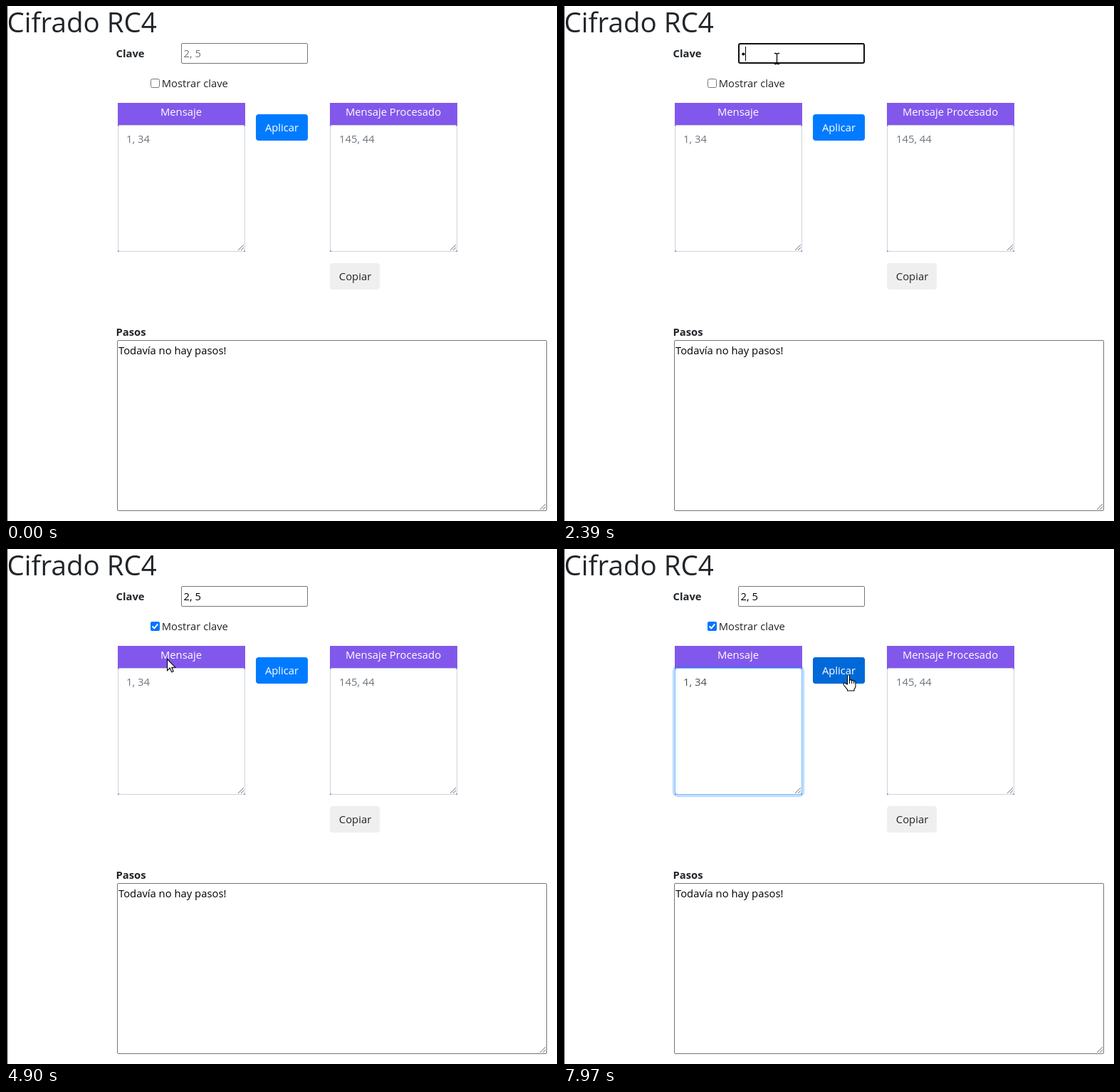
Recreate the animation shown at these times as an HTML page with a canvas. Size 774 by 723 pixels, loop 8 s.

```html
<!DOCTYPE html>
<html lang="es">
<head>
<meta charset="utf-8">
<title>Cifrado RC4</title>
<style>
  html, body { margin: 0; width: 100%; height: 100%; overflow: hidden; background: #fff; }
  canvas { display: block; }
</style>
</head>
<body>
<canvas id="stage" width="774" height="723"></canvas>
<script>
const ctx = document.getElementById('stage').getContext('2d');
const LOOP = 8000, BLINK = 550;
const FAMILY = '"Open Sans", "Noto Sans", sans-serif';
const BODY = '14.8px ' + FAMILY;
const BOLD = 'bold 14.8px ' + FAMILY;
const INK = '#212529', GRAY = '#767676', PURPLE = '#8258ec', HOLDER = '#6c757d';

// x, y, width, height
const key = [246, 52, 178, 29];
const message = [157, 167, 179, 178];
const result = [455, 167, 179, 178];
const steps = [156, 469, 604, 240];
const apply = [351, 152, 73, 37];
const copy = [455, 361, 70, 37];
const label = [219, 100, 94, 20];

// Pointer moves: start, end, number of positions, path
const moves = [
  [70, 820, 11, [[640, 600], [475, 500], [385, 330], [310, 160], [285, 110]]],
  [900, 1140, 4, [[282, 84], [276, 67]]],
  [1690, 1760, 2, [[290, 73], [300, 74]]],
  [3630, 4420, 11, [[279, 63], [255, 34], [235, 60], [215, 95], [203, 112]]],
  [4500, 4580, 2, [[199, 111], [197, 111]]],
  [4740, 5220, 7, [[203, 114], [226, 154], [243, 182], [249, 190]]],
  [5690, 5770, 2, [[246, 185], [238, 190]]],
  [7490, 7970, 7, [[220, 124], [275, 178], [372, 190], [402, 177]]]
];
const keyTimes = [2390, 2780, 3000, 3160];
const typed = [[6170, '1'], [6720, '1, '], [6940, '1, 3'], [7100, '1, 34']];

const inside = (p, [x, y, w, h]) =>
  p && p[0] >= x && p[0] < x + w && p[1] >= y && p[1] < y + h;

function pointerAt(t) {
  const move = moves.filter(m => m[0] <= t).pop();
  if (!move) return null;
  const [a, b, n, path] = move;
  const k = Math.min(n - 1, Math.floor((t - a) / (b - a) * (n - 1) + 0.02));
  const u = k / (n - 1) * (path.length - 1);
  const i = Math.min(path.length - 2, Math.floor(u + 1e-6));
  const f = u - i, p = path[i], q = path[i + 1];
  return [0, 1].map(c => Math.round(p[c] + (q[c] - p[c]) * f));
}

function text(s, x, y, color = INK, font = BODY, align = 'left') {
  ctx.font = font;
  ctx.fillStyle = color;
  ctx.textAlign = align;
  ctx.fillText(s, x, y);
}

function fillBox([x, y, w, h], color, r = 0) {
  ctx.beginPath();
  ctx.roundRect(x, y, w, h, r);
  ctx.fillStyle = color;
  ctx.fill();
}

function frame([x, y, w, h], color, r, line = 1) {
  ctx.beginPath();
  ctx.roundRect(x + line / 2, y + line / 2, w - line, h - line, r);
  ctx.strokeStyle = color;
  ctx.lineWidth = line;
  ctx.stroke();
}

function polyline(points, color, width, close) {
  ctx.beginPath();
  points.forEach(p => ctx.lineTo(p[0], p[1]));
  if (close) ctx.closePath();
  ctx.strokeStyle = color;
  ctx.lineWidth = width;
  ctx.stroke();
}

function grip([x, y, w, h]) {
  const r = x + w - 2, b = y + h - 2;
  for (const d of [8, 4]) polyline([[r - d, b], [r, b - d]], '#777', 1);
}

function caret(x, y, color, age) {
  if (age % (2 * BLINK) < BLINK) fillBox([Math.round(x), y, 1, 20], color);
}

function panel(box, title) {
  const [x, y, w, h] = box;
  fillBox([x, 136, w, y + h - 136], PURPLE);
  text(title, x + w / 2 - 0.5, 154, '#fff', BODY, 'center');
}

function area(box, focus) {
  const [x, y, w, h] = box;
  if (focus) {
    const s = 3.2 * focus;
    ctx.beginPath();
    ctx.roundRect(x - s, y - s, w + 2 * s, h + 2 * s, 4 + s);
    ctx.roundRect(x, y, w, h, 4);
    ctx.fillStyle = `rgba(0,123,255,${0.25 * focus})`;
    ctx.fill('evenodd');
  }
  fillBox(box, '#fff', 4);
  frame(box, '#ced4da', 3.5);
  if (focus) {
    ctx.globalAlpha = focus;
    frame(box, '#80bdff', 3.5);
    ctx.globalAlpha = 1;
  }
  grip(box);
}

function drawKey(t, pointer) {
  const focused = t >= 1380 && t < 4500;
  if (focused) frame(key, '#101010', 2, 2);
  else frame(key, inside(pointer, key) ? '#222' : GRAY, 1.5);

  const count = keyTimes.filter(k => k <= t).length;
  if (t >= 4740) text('2, 5', 249.5, 72, '#000');
  else if (!count) text('2, 5', 249.5, 72, '#757575');
  else {
    ctx.fillStyle = '#000';
    for (let i = 0; i < count; i++) {
      ctx.beginPath();
      ctx.arc(253.4 + 6.4 * i, 67.5, 2.1, 0, 7);
      ctx.fill();
    }
  }
  if (focused) caret(250 + 6.4 * count, 57, '#000', t - (count ? keyTimes[count - 1] : 1380));
}

function drawCheck(t) {
  const box = [203, 102, 13, 13];
  if (t >= 4740) {
    fillBox(box, '#0075ff', 2);
    polyline([[205.5, 108.5], [208.3, 111.3], [213.3, 105.3]], '#fff', 2);
  } else frame(box, GRAY, 2);
  text('Mostrar clave', 218.7, 114);
}

function drawMessage(t) {
  panel(message, 'Mensaje');
  const fade = Math.floor((t - 5380) / 75 + 1) / 3;
  area(message, Math.max(0, Math.min(1, fade)));
  const last = typed.filter(k => k[0] <= t).pop();
  const value = last ? last[1] : '';
  text(value || '1, 34', 169, 192, value ? '#495057' : HOLDER);
  if (t >= 5380) {
    caret(169.5 + ctx.measureText(value).width, 176, '#495057', t - (last ? last[0] : 5380));
  }
}

function drawBeam(ghost) {
  const bars = () => {
    ctx.beginPath();
    ctx.moveTo(-3, -7.5); ctx.lineTo(-1, -7.5); ctx.lineTo(0.5, -6.5);
    ctx.lineTo(2, -7.5); ctx.lineTo(4, -7.5);
    ctx.moveTo(0.5, -6.5); ctx.lineTo(0.5, 6.5);
    ctx.moveTo(-3, 7.5); ctx.lineTo(-1, 7.5); ctx.lineTo(0.5, 6.5);
    ctx.lineTo(2, 7.5); ctx.lineTo(4, 7.5);
    ctx.stroke();
  };
  ctx.strokeStyle = ghost ? '#555' : '#000';
  ctx.lineWidth = ghost ? 2.8 : 1.3;
  bars();
  if (ghost) {
    ctx.strokeStyle = '#fff';
    ctx.lineWidth = 1;
    bars();
  }
}

function drawShape(d) {
  const path = new Path2D(d);
  ctx.fillStyle = '#fff';
  ctx.fill(path);
  ctx.strokeStyle = '#000';
  ctx.lineWidth = 1.1;
  ctx.stroke(path);
}

function drawPointer(p, t) {
  if (!p) return;
  ctx.save();
  ctx.translate(p[0], p[1]);
  if ([key, message, result, steps, label].some(b => inside(p, b))) {
    drawBeam(t >= 3630 && t < 4500);
  } else if ([apply, copy].some(b => inside(p, b))) {
    drawShape('M-2.5 13V1.5Q-2.5-.5-1-.5T.5 1.5V8Q.8 6.4 2.2 6.6T3.7 8.3Q4 7 5.3 7.3T6.7 9Q7.2 8 8.2 8.6' +
      'T9 10.5V15Q9 18 7 20V22H-2.5V20.5L-7.5 14Q-8.8 12-7.2 11.2T-4.5 12.2Z');
    polyline([[0.5, 8], [0.5, 12]], '#000', 1);
    polyline([[3.7, 8.5], [3.7, 12]], '#000', 1);
    polyline([[6.7, 9], [6.7, 12]], '#000', 1);
  } else {
    drawShape('M.5 .5V16.6L4.2 13L6.7 18.8L9.2 17.7L6.8 12.2H11.8Z');
  }
  ctx.restore();
}

function draw(t) {
  const pointer = pointerAt(t);
  fillBox([0, 0, 774, 723], '#fff');
  fillBox([0, 0, 2, 723], '#000');
  text('Cifrado RC4', 1.5, 37, INK, '500 38.5px ' + FAMILY);

  text('Clave', 154.5, 72, INK, BOLD);
  drawKey(t, pointer);
  drawCheck(t);
  drawMessage(t);

  const hot = inside(pointer, apply);
  fillBox(apply, hot ? '#0069d9' : '#007bff', 4);
  if (hot) frame(apply, '#0062cc', 3.5);
  text('Aplicar', 387.5, 176, '#fff', BODY, 'center');

  panel(result, 'Mensaje Procesado');
  area(result, 0);
  text('145, 44', 468, 192, HOLDER);
  fillBox(copy, '#efefef', 4);
  text('Copiar', 490.5, 385, INK, BODY, 'center');

  text('Pasos', 154.5, 463, INK, BOLD);
  frame(steps, inside(pointer, steps) ? '#222' : GRAY, 1.5);
  grip(steps);
  text('Todavía no hay pasos!', 158, 489, '#000');

  drawPointer(pointer, t);
}

const start = performance.now();
function tick() {
  draw((performance.now() - start) % LOOP);
  requestAnimationFrame(tick);
}
tick();
</script>
</body>
</html>
```
